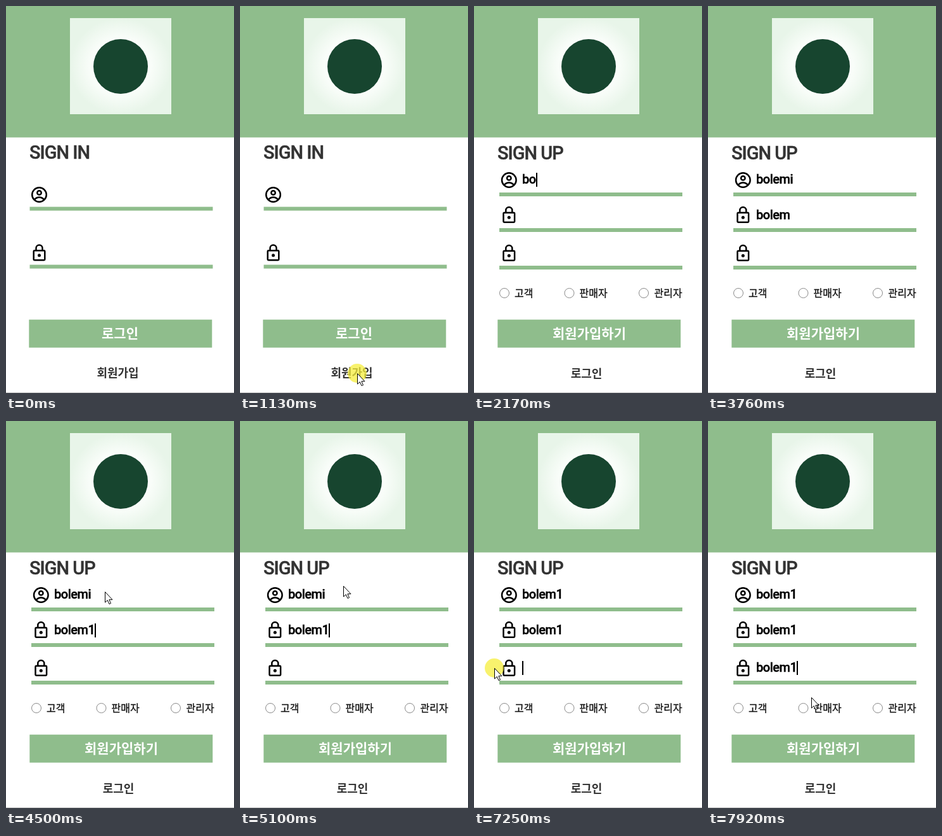
An HTML page for the animation above (7990 ms loop, 360 by 608 pixels).

```html
<!DOCTYPE html>
<html lang="ko">
<head>
<meta charset="utf-8">
<title>Sign up</title>
<style>
  html, body { margin: 0; width: 100%; height: 100%; overflow: hidden; background: #fff; }
  svg { display: block; width: 360px; height: 608px; }
  text { fill: #333; font-family: "Noto Sans CJK KR", "Noto Sans CJK", "Noto Sans KR", sans-serif; }
  .title { font: 500 29px Roboto, sans-serif; letter-spacing: -1px; stroke: #333; stroke-width: .4px; }
  .value { font: 500 20px Roboto, sans-serif; letter-spacing: -.5px; fill: #000; stroke: #000; stroke-width: .4px; }
  .mid { text-anchor: middle; }
  .btn { font-size: 21px; font-weight: 700; fill: #fff; }
  .foot { font-size: 18px; font-weight: 700; }
  .label { font-size: 16px; font-weight: 500; fill: #111; stroke: #111; stroke-width: .3px; }
  .bar { fill: #8fbd8c; }
  .icon { fill: none; stroke: #000; stroke-width: 2.5; }
  .radio { fill: #fff; stroke: #8a8a8a; }
</style>
</head>
<body>
<svg viewBox="0 0 360 608">
  <defs>
    <radialGradient id="glow">
      <stop offset=".5" stop-color="#fdfffd"/>
      <stop offset="1" stop-color="#e8f5e9"/>
    </radialGradient>
    <g id="user" class="icon">
      <circle r="11.3"/>
      <circle cy="-3.1" r="3.2"/>
      <path d="M-8 8Q-4.500 4 0 4T8 8"/>
    </g>
    <g id="lock" class="icon">
      <rect x="-8.800" y="-3.800" width="17.600" height="15" rx="1.200"/>
      <path d="M-5-4v-3.500a5 5 0 0 1 10 0v3.500"/>
      <circle cy="3.700" r="2.500" fill="#000" stroke="none"/>
    </g>
    <rect id="line" class="bar" width="289" height="6"/>
    <rect id="button" class="bar" width="289" height="44"/>
    <circle id="radio" class="radio" r="7.500"/>
  </defs>
  <rect width="360" height="608" fill="#fff"/>
  <rect class="bar" width="360" height="206.500"/>
  <rect x="101" y="19" width="160" height="151" fill="url(#glow)"/>
  <circle cx="181" cy="95" r="43" fill="#17452f"/>

  <g id="signIn">
    <text class="title" x="37" y="239.500">SIGN IN</text>
    <use href="#user" x="52.500" y="296.500"/>
    <use href="#lock" x="52.500" y="388"/>
    <use href="#line" x="37.500" y="315.500"/>
    <use href="#line" x="37.500" y="406.500"/>
    <use href="#button" x="36.300" y="492.700"/>
    <text class="btn mid" x="180" y="521.500">로그인</text>
    <text class="foot mid" x="176.500" y="582.500">회원가입</text>
  </g>

  <g id="signUp">
    <text class="title" x="37" y="240.500">SIGN UP</text>
    <use href="#user" x="55.300" y="273.500"/>
    <use href="#lock" x="55.300" y="328.500"/>
    <use href="#lock" x="55.300" y="388.500"/>
    <use href="#line" x="40" y="293"/>
    <use href="#line" x="40" y="349"/>
    <use href="#line" x="40" y="408"/>
    <text class="value" x="76" y="279"></text>
    <text class="value" x="76" y="335"></text>
    <text class="value" x="76" y="394"></text>
    <rect id="caret" width="2" height="22"/>
    <use href="#radio" x="48" y="451"/>
    <use href="#radio" x="150.500" y="451"/>
    <use href="#radio" x="268" y="451"/>
    <text class="label" x="64" y="456.500">고객</text>
    <text class="label" x="166.500" y="456.500">판매자</text>
    <text class="label" x="284.500" y="456.500">관리자</text>
    <use href="#button" x="37.300" y="492.700"/>
    <text class="btn mid" x="182" y="521.500">회원가입하기</text>
    <text class="foot mid" x="177.500" y="583.500">로그인</text>
  </g>

  <rect y="607" width="360" height="1" fill="#c4c4c4"/>
  <g id="mouse">
    <circle id="press" r="15" fill="#f5ee3c" opacity=".75"/>
    <path d="M.5.5V17L4.300 13.600l2.700 6 2.500-1.100-2.600-5.800h5.100z" fill="#fff" stroke="#000"/>
  </g>
</svg>
<script>
  const LOOP = 7990, STEP = 67, KEY = 70, BLINK = 530, PRESS = 140, PAGE_AT = 1400;
  const $ = id => document.getElementById(id);
  const show = (el, on) => el.setAttribute("visibility", on ? "visible" : "hidden");
  const values = [...document.querySelectorAll(".value")];
  const word = "bolem", slip = word + "i", login = word + "1";

  // time, field, letters kept, text typed up to; nothing to type means plain focus
  const bursts = [
    [1750, 0, 0, ""], [2030, 0, 0, slip],
    [2640, 1, 0, ""], [2840, 1, 0, word], [3970, 1, 5, login],
    [5490, 0, 6, slip], [6145, 0, 5, login],
    [7250, 2, 0, ""], [7340, 2, 0, login]
  ];
  const isTyping = ([, , kept, text]) => text.length > kept;

  // start, end, x, y; each glide sets out from the previous stop
  const glides = [
    [0, 0, 332, 545], [200, 470, 185, 577], [1470, 1750, 172, 282],
    [4100, 4700, 147, 261], [4770, 4900, 163, 259], [5360, 5490, 172, 264],
    [5630, 5820, 184, 240], [6630, 6980, 172, 317], [7180, 7250, 32, 388],
    [7780, 7920, 163, 434]
  ];
  const presses = [1130, 1750, 5490, 7250];

  // Typing hides the pointer until it moves again.
  function pointer(t) {
    const i = glides.findLastIndex(g => g[0] <= t);
    if (i < 1) return null;
    const [start, end, x, y] = glides[i];
    if (bursts.some(b => isTyping(b) && b[0] > start && b[0] <= t)) return null;
    const [, , x0, y0] = glides[i - 1];
    const p = t >= end ? 1 : Math.floor((t - start) / STEP + 1) * STEP / (end - start + STEP);
    const e = p * p * (3 - 2 * p);
    return [Math.round(x0 + (x - x0) * e), Math.round(y0 + (y - y0) * e)];
  }

  function drawFields(t) {
    const texts = ["", "", ""];
    let field = -1, changed = 0;
    for (const [at, f, kept, text] of bursts) {
      if (at > t) break;
      const typed = Math.min(text.length - kept, Math.floor((t - at) / KEY));
      texts[f] = text.slice(0, kept + typed);
      field = f;
      changed = at + typed * KEY;
    }
    values.forEach((el, i) => { el.textContent = texts[i]; });
    show($("caret"), field >= 0 && (t - changed) % (2 * BLINK) < BLINK);
    if (field < 0) return;
    const box = values[field];
    const width = texts[field] ? box.getComputedTextLength() : 0;
    $("caret").setAttribute("x", Math.round(76 + width));
    $("caret").setAttribute("y", box.getAttribute("y") - 17);
  }

  function draw(t) {
    const second = t >= PAGE_AT;
    show($("signIn"), !second);
    show($("signUp"), second);
    drawFields(t);
    const at = pointer(t);
    show($("mouse"), at);
    if (at) $("mouse").setAttribute("transform", `translate(${at})`);
    show($("press"), at && presses.some(p => t >= p && t < p + PRESS));
  }

  const begin = performance.now();
  function tick() {
    draw((performance.now() - begin) % LOOP);
    requestAnimationFrame(tick);
  }
  tick();
</script>
</body>
</html>
```
